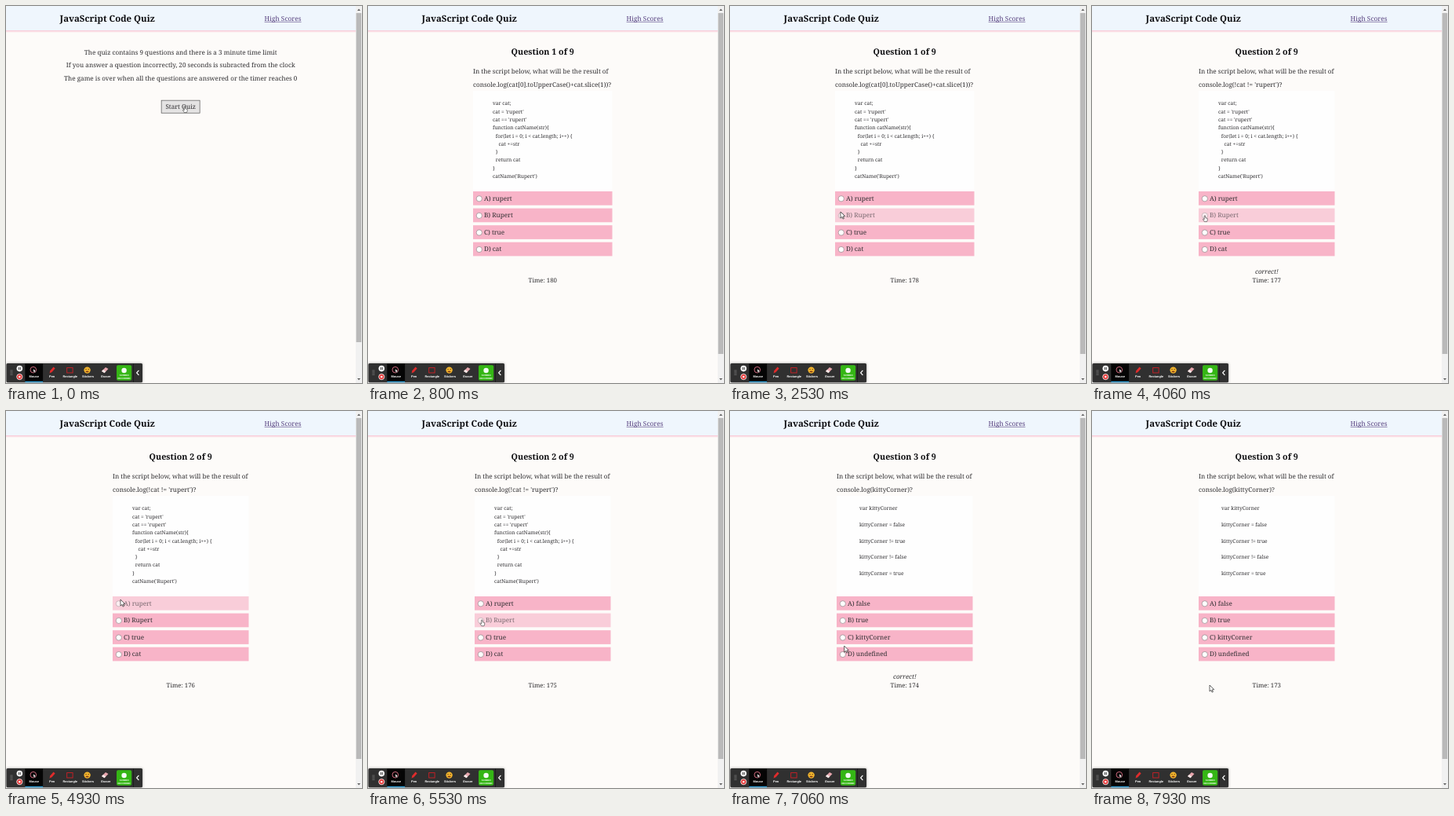
Recreate the animation shown at these times as an HTML page with a canvas. Size 454x480 px, loop 8000 ms.

```html
<!DOCTYPE html>
<html lang="en">
<head>
<meta charset="utf-8">
<title>JavaScript Code Quiz</title>
<style>
  html, body { margin: 0; width: 100%; height: 100%; overflow: hidden; background: #fdfbf9; }
  canvas { display: block; width: 454px; height: 480px; }
</style>
</head>
<body>
<canvas id="stage"></canvas>
<script>
const W = 454, H = 480, LOOP = 8000;
const SERIF = '"Noto Serif", "Liberation Serif", serif';
const SANS = '"Liberation Sans", Inter, sans-serif';
const INK = '#302f32', PINK = '#f8b4c8', BODY = 8.13;
const canvas = document.getElementById('stage');
const ctx = canvas.getContext('2d');
const dpr = window.devicePixelRatio || 1;
canvas.width = W * dpr;
canvas.height = H * dpr;
ctx.textRendering = 'geometricPrecision';

const QUIZ_START = 400, CLICKS = [400, 3450, 6080], PRAISE = 1000;
const ROW_Y = [236, 257.6, 279.2, 300.7], ROW_H = 17.7;

const catCode = [
  'var cat;', "cat = 'rupert'", "cat == 'rupert'", 'function catName(str){',
  '  for(let i = 0; i < cat.length; i++) {', '    cat +=str', '  }',
  '  return cat', '}', "catName('Rupert')"
];
const catAnswers = ['A) rupert', 'B) Rupert', 'C) true', 'D) cat'];
const questions = [
  { x: 134, w: 177.5, codeX: 159, prompt: 'console.log(cat[0].toUpperCase()+cat.slice(1))?',
    code: catCode, answers: catAnswers },
  { x: 136, w: 173.5, codeX: 161, prompt: "console.log(!cat != 'rupert')?",
    code: catCode, answers: catAnswers },
  { x: 136, w: 173.5, codeX: 165, prompt: 'console.log(kittyCorner)?',
    code: ['var kittyCorner', '', 'kittyCorner = false', '', 'kittyCorner != true', '',
           'kittyCorner != false', '', 'kittyCorner = true'],
    answers: ['A) false', 'B) true', 'C) kittyCorner', 'D) undefined'] }
];

// Pointer path: time, x, y
const path = [
  [0, 228, 128], [900, 228, 128], [1750, 160, 215], [2450, 141, 262], [2930, 141, 262],
  [3000, 144, 267], [4250, 144, 267], [4900, 146, 240], [5150, 146, 240],
  [5900, 145, 291], [6850, 145, 291], [7750, 150, 349], [LOOP, 150, 349]
];

function pointerAt(t) {
  const i = Math.max(1, path.findIndex(p => p[0] > t));
  const [t0, x0, y0] = path[i - 1], [t1, x1, y1] = path[i];
  const u = (t - t0) / (t1 - t0), e = u * u * (3 - 2 * u);
  return { x: x0 + (x1 - x0) * e, y: y0 + (y1 - y0) * e };
}

function rect(x, y, w, h, color) {
  ctx.fillStyle = color;
  ctx.fillRect(x, y, w, h);
}

function text(str, x, y, size, { style = '', align = 'left', color = INK, family = SERIF } = {}) {
  ctx.font = `${style} ${size}px ${family}`;
  ctx.textAlign = align;
  ctx.fillStyle = color;
  ctx.fillText(str, x, y);
}

function circle(x, y, r, fill, stroke, width = 1) {
  ctx.beginPath();
  ctx.arc(x, y, r, 0, Math.PI * 2);
  paint(fill, stroke, width);
}

function poly(points, fill, stroke, width = 1, closed = true) {
  ctx.beginPath();
  points.forEach(([x, y]) => ctx.lineTo(x, y));
  if (closed) ctx.closePath();
  paint(fill, stroke, width);
}

function roundBox(x, y, w, h, r, fill) {
  ctx.beginPath();
  ctx.roundRect(x, y, w, h, r);
  paint(fill);
}

function paint(fill, stroke, width) {
  if (fill) { ctx.fillStyle = fill; ctx.fill(); }
  if (stroke) { ctx.strokeStyle = stroke; ctx.lineWidth = width; ctx.stroke(); }
}

function drawHeader() {
  const glow = ctx.createLinearGradient(0, 30, 0, 34);
  glow.addColorStop(0, '#f6b3c7');
  glow.addColorStop(1, '#fdfbf9');
  rect(0, 30, 446, 4, glow);
  rect(0, 0, 446, 31, '#eff6fd');
  text('JavaScript Code Quiz', 68.6, 19.8, 11.45, { style: 'bold', color: '#0d0d10' });
  text('High Scores', 329.6, 18.9, 8.35, { color: '#57417f' });
  rect(329.6, 19.9, 47, 0.6, '#57417f');
}

function drawScrollbar(bottom) {
  rect(446, 0, 8, H, '#f1f1f1');
  rect(446.6, 9, 6.6, bottom - 9, '#b9b9b9');
  poly([[448, 6], [450, 3.5], [452, 6]], '#606060');
  poly([[448, 474], [450, 476.5], [452, 474]], '#606060');
}

function drawIntro() {
  const mid = { align: 'center' };
  text('The quiz contains 9 questions and there is a 3 minute time limit', 222.7, 61.5, BODY, mid);
  text('If you answer a question incorrectly, 20 seconds is subracted from the clock', 222.7, 78.4, BODY, mid);
  text('The game is over when all the questions are answered or the timer reaches 0', 222.7, 95.2, BODY, mid);
  rect(197.8, 119.8, 49.7, 16.8, '#555');
  rect(198.5, 120.5, 48.3, 15.4, '#e4e3e3');
  text('Start Quiz', 222.7, 130.9, BODY, mid);
}

function drawAnswer(q, i, hovered) {
  const y = ROW_Y[i];
  ctx.globalAlpha = hovered ? 0.63 : 1;
  rect(q.x, y, q.w, ROW_H, PINK);
  circle(q.x + 7.8, y + 9.3, 3.6, '#fff', '#817a7d', 0.6);
  text(q.answers[i], q.x + 14, y + 11.7, BODY);
  ctx.globalAlpha = 1;
}

function drawQuestion(index, pos, seconds, praised) {
  const q = questions[index];
  text(`Question ${index + 1} of 9`, 222.7, 62.1, 10.75, { style: 'bold', align: 'center', color: '#0d0d10' });
  rect(q.x, 108, q.w, 128, '#fefefe');
  text('In the script below, what will be the result of', q.x, 85.7, BODY);
  text(q.prompt, q.x, 102.5, BODY);
  q.code.forEach((line, i) => {
    const indent = line.length - line.trimStart().length;
    text(line.trimStart(), q.codeX + indent * 1.9, 126.3 + i * 10.3, 6.6);
  });
  ROW_Y.forEach((y, i) => {
    const over = pos.x > q.x && pos.x < q.x + q.w && pos.y >= y && pos.y < y + ROW_H;
    drawAnswer(q, i, over);
  });
  if (praised) text('correct!', 222.8, 341, BODY, { style: 'italic', align: 'center' });
  text(`Time: ${seconds}`, 222.8, 352.1, 7.85, { align: 'center' });
}

function drawArrow(x, y, s = 1) {
  const shape = [[0, 0], [0, 8], [1.9, 6.4], [3.1, 9.1], [4.4, 8.5], [3.2, 5.9], [5.7, 5.7]];
  poly(shape.map(([a, b]) => [x + a * s, y + b * s]), '#fff', '#222', 0.7 * s);
}

function drawHand(x, y) {
  const shape = [[-0.8, 0], [0.5, 0], [0.7, 2.7], [3.2, 3.5], [3.2, 5.8], [2.5, 7.6], [-0.6, 7.6], [-2.6, 4.6], [-1.9, 3.9], [-0.8, 4.9]];
  poly(shape.map(([a, b]) => [x + a, y + b]), '#fff', '#333', 0.6);
}

function drawClick(t, pos) {
  CLICKS.forEach(start => {
    const age = t - start;
    if (age < 0 || age > 350) return;
    ctx.globalAlpha = age < 180 ? 1 : 1 - (age - 180) / 170;
    circle(pos.x, pos.y, 10.4, 'rgba(240,150,170,0.2)', '#e4849b', 1.2);
    ctx.globalAlpha = 1;
  });
}

// A hand over the button and radios, an arrow elsewhere below the code
function drawPointer(pos, question) {
  const overRadio = question && ROW_Y.some(y =>
    Math.hypot(pos.x - question.x - 7.8, pos.y - y - 9.3) < 3.9);
  if (!question || overRadio) drawHand(pos.x, pos.y);
  else if (pos.y >= 236) drawArrow(pos.x, pos.y);
}

function drawToolbar() {
  ctx.save();
  ctx.shadowColor = 'rgba(0,0,0,0.45)';
  ctx.shadowBlur = 3 * dpr;
  roundBox(0.5, 455, 173.5, 24.3, 1.5, '#303030');
  ctx.restore();
  for (let i = 0; i < 8; i++) rect(5.6 + (i % 2) * 1.8, 463.6 + (i >> 1) * 1.8, 0.9, 0.9, '#999');

  circle(17.3, 461.6, 3.8, '#fff');
  rect(15.9, 459.9, 0.9, 3.4, '#222');
  rect(17.8, 459.9, 0.9, 3.4, '#222');
  circle(17.3, 472.1, 3.6, '#e53030', '#fff', 0.8);
  rect(16.1, 470.9, 2.4, 2.4, '#fff');

  rect(24.3, 455.5, 22.8, 23.5, '#050505');
  rect(24.3, 477.8, 22.8, 1.4, '#2f9fd6');
  circle(34.8, 463.2, 3.8, null, '#e5748a', 0.9);
  drawArrow(35, 462, 0.55);

  poly([[55.6, 467.5], [56.4, 464.3], [60.6, 459.6], [62.6, 461.5], [58.5, 466.2]], '#e02c2c');
  ctx.strokeStyle = '#d01f26';
  ctx.lineWidth = 0.9;
  ctx.strokeRect(77.7, 460.6, 7.4, 6.4);

  circle(103.6, 463.6, 4.2, '#f3b52d');
  rect(101.4, 462, 1.2, 1, '#553313');
  rect(104.6, 462, 1.2, 1, '#553313');
  ctx.beginPath();
  ctx.arc(103.6, 464.2, 2.2, 0.2, Math.PI - 0.2);
  paint('#7c3516');

  poly([[122, 464.9], [127, 460], [130.5, 462], [125.5, 467.2]], '#e7a6ad');
  poly([[122, 464.9], [124, 463], [127.3, 465.3], [125.5, 467.2]], '#f4e9e8');

  const label = { style: 'bold', align: 'center', color: '#fff', family: SANS };
  [['Mouse', 35.7], ['Pen', 58.6], ['Rectangle', 81.7], ['Stickers', 104.6], ['Eraser', 127.3]]
    .forEach(([name, x]) => text(name, x, 473.2, 3.9, label));

  roundBox(141, 457.2, 19.2, 19.6, 2, '#35b615');
  circle(150.6, 464, 3.2, '#f3fbf4');
  text('SCREEN', 150.6, 471.4, 2.8, label);
  text('RECORDER', 150.6, 474.6, 2.8, label);

  rect(162, 455.5, 0.7, 23.5, '#151515');
  poly([[169.4, 464], [166.6, 467], [169.4, 470]], null, '#fff', 1.1, false);
}

function draw(t) {
  ctx.setTransform(dpr, 0, 0, dpr, 0, 0);
  const pos = pointerAt(t);
  const started = t >= QUIZ_START;
  const index = CLICKS.filter(c => t >= c).length - 1;
  rect(0, 0, W, H, '#fdfbf9');
  drawHeader();
  drawScrollbar(started ? 443 : 428);
  if (started) {
    const seconds = 180 - Math.floor((t - QUIZ_START) / 1000);
    drawQuestion(index, pos, seconds, index > 0 && t - CLICKS[index] < PRAISE);
  } else {
    drawIntro();
  }
  drawClick(t, pos);
  drawPointer(pos, questions[index]);
  drawToolbar();
}

const begin = performance.now();
function tick() {
  draw((performance.now() - begin) % LOOP);
  requestAnimationFrame(tick);
}
tick();
</script>
</body>
</html>
```
